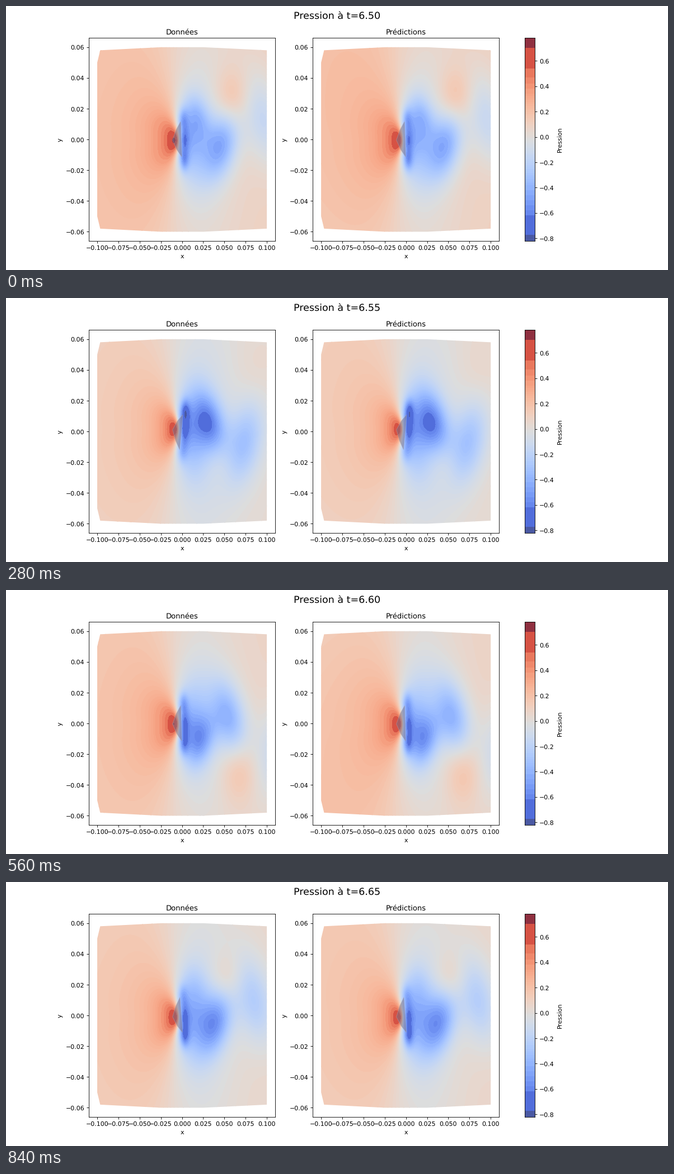
Recreate the animation shown at these times as a matplotlib script. Size 1183 by 473 pixels, loop 0.98 s.

```python
import numpy as np
import matplotlib.pyplot as plt
from matplotlib import colorbar
from matplotlib.animation import FuncAnimation
from matplotlib.colors import ListedColormap, BoundaryNorm
from matplotlib.patches import Polygon

FRAMES, STEP_MS = 7, 140
HALF_PERIOD = 3.3          # steps between two vortices of opposite side
LOW, HIGH = -0.82, 0.78

# Fine colour steps around zero, coarse ones towards both ends
LEVELS = np.concatenate([
    [LOW, -0.77, -0.62], np.arange(-0.58, -0.4, 0.04),
    np.linspace(-0.38, 0.34, 46), [0.38, 0.42, 0.47, 0.54, 0.70, HIGH]])
CENTERS = (LEVELS[1:] + LEVELS[:-1]) / 2
COLORS = plt.cm.coolwarm((CENTERS - LOW) / (HIGH - LOW))
COLORS[0, :3] = 0.29, 0.35, 0.64
COLORS[-1, :3] = 0.56, 0.19, 0.25
CMAP = ListedColormap(COLORS)
NORM = BoundaryNorm(LEVELS, CMAP.N)

UPPER = [(-0.1, 0.05), (-0.0965, 0.058), (-0.025, 0.06),
         (0.025, 0.06), (0.1, 0.058)]
DOMAIN = UPPER + [(x, -y) for x, y in reversed(UPPER)]
BODY = np.array([(-0.001, 0.0115), (-0.0065, 0.0065), (-0.0112, 0),
                 (-0.0065, -0.0065), (-0.001, -0.0115)])

X, Y = np.meshgrid(np.linspace(-0.101, 0.101, 300), np.linspace(-0.061, 0.061, 240))


def wave(i, start, period=2 * HALF_PERIOD):
    return np.sin(2 * np.pi * (i - start) / period)


def bump(x0, y0, sx, sy, shear=0):
    dx = X - x0 - shear * (Y - y0)
    return np.exp(-0.5 * ((dx / sx) ** 2 + ((Y - y0) / sy) ** 2))


def vortex(age, side):
    """Low-pressure core drifting downstream, with a crest on the other side."""
    grow = max(age, 0)
    x = 0.018 + 0.0055 * age + 0.00095 * age ** 2
    y = 0.0042 + 0.0009 * (age - 3.4) ** 2
    q = (age + 1.2) / 3.8
    depth = 0.45 * (q * np.exp(1 - q)) ** 2
    crest = 0.17 * np.exp(-0.5 * (age - 3.5) ** 2)
    core = bump(x, side * y, 0.0105 + 0.001 * grow, 0.0095 + 0.0018 * grow, -0.3 * side)
    ridge = bump(x + 0.013, -side * (0.008 + 0.0058 * age),
                 0.009 + 0.0015 * grow, 0.007 + 0.0017 * grow)
    return crest * ridge - depth * core


def pressure(i, predicted):
    sway = wave(i, 0.4)
    v = 0.9 * (Y - 0.0015 * sway)
    u = X + 0.007 - 0.0035 * np.exp(-(v / 0.009) ** 2)
    dipole = u / (u ** 2 + v ** 2 + 0.0055 ** 2)
    front = 0.0071 if predicted else 0.0075
    p = 0.08 + 0.04 * wave(i, -1.1, 3.6) - dipole * np.where(u < 0, front, 0.00325)

    behind = 1 / (1 + np.exp(-u / 0.004))
    p -= 0.25 * bump(0.012, 0, 0.016, 0.021) * behind
    p -= 0.09 * bump(0.02, 0, 0.03, 0.08)
    p -= 0.2 * bump(0.003, 0, 0.004, 0.009)
    for side in (1, -1):
        p -= (0.25 + 0.1 * side * sway) * bump(
            0.0015 + 0.002 * side * sway, side * 0.0135, 0.0042, 0.005)

    for j in range(-2, 3):
        age = i + HALF_PERIOD * j
        if -1 < age <= 8:
            p += vortex(age, 1 if j % 2 == 0 else -1)
    if predicted:
        p += 0.01 + 0.03 * wave(i, -0.9) * (Y / 0.06) * (1 - X / 0.1) / 2
    return np.clip(p, LOW + 1e-4, HIGH - 1e-4)


def body_outline(i):
    a = np.radians(-9 * wave(i, 0.4))
    pivot = np.array([-0.004, 0])
    turn = np.array([[np.cos(a), np.sin(a)], [-np.sin(a), np.cos(a)]])
    return (BODY - pivot) @ turn + pivot


plt.rcParams["text.hinting"] = "none"
fig, axes = plt.subplots(1, 2, figsize=(15, 6), dpi=78.8667)
fig.subplots_adjust(top=0.8785)
cax, _ = colorbar.make_axes(list(axes))
title = fig.suptitle("", fontsize=16)

for ax, name in zip(axes, ("Données", "Prédictions")):
    ax.set(title=name, xlabel="x", ylabel="y",
           xlim=(-0.11, 0.11), ylim=(-0.066, 0.066))

cax.pcolormesh([0, 1], LEVELS, CENTERS[:, None], cmap=CMAP, norm=NORM)
cax.set(xlim=(0, 1), ylim=(LOW, HIGH), xticks=[], yticks=np.arange(-4, 4) * 0.2)
cax.yaxis.tick_right()
cax.yaxis.set_label_position("right")
cax.set_ylabel("Pression")

drawn = []


def update(i):
    while drawn:
        drawn.pop().remove()
    for ax, predicted in zip(axes, (False, True)):
        field = ax.contourf(X, Y, pressure(i, predicted), levels=LEVELS,
                            cmap=CMAP, norm=NORM)
        field.set_clip_path(Polygon(DOMAIN, transform=ax.transData))
        body = ax.add_patch(Polygon(body_outline(i), facecolor=(0.45, 0.42, 0.52, 0.5),
                                    edgecolor=(0.65, 0.65, 0.7, 0.5), lw=0.8, zorder=2))
        ax.set(xlim=(-0.11, 0.11), ylim=(-0.066, 0.066))
        drawn.extend([field, body])
    title.set_text(f"Pression à t={6.5 + 0.025 * i + 1e-6:.2f}")
    return drawn


anim = FuncAnimation(fig, update, frames=FRAMES, init_func=lambda: update(0),
                     interval=STEP_MS, repeat=True, repeat_delay=0, blit=False)
plt.show()
```
